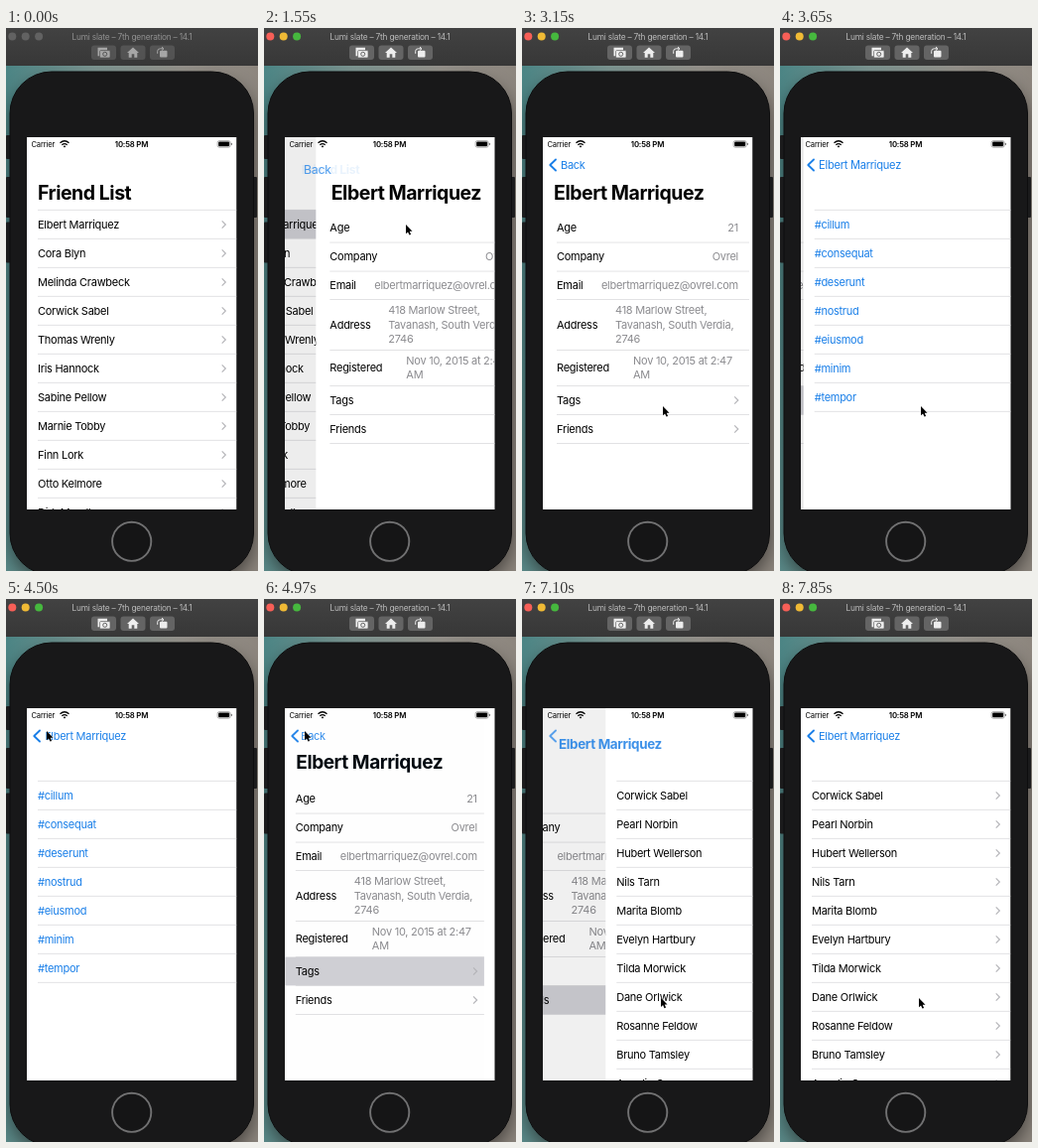
An HTML page for the animation above (8000 ms loop, 254x547 px).

```html
<!DOCTYPE html>
<html lang="en">
<head>
<meta charset="utf-8">
<title>List navigation</title>
<style>
  html, body { margin: 0; width: 100%; height: 100%; overflow: hidden; background: #222; }
  svg { display: block; width: 100vw; height: 100vh; }
  text { font-family: Inter, "Open Sans", sans-serif; letter-spacing: -.024em; white-space: pre; }
</style>
</head>
<body>
<svg id="stage" viewBox="0 0 254 547" preserveAspectRatio="none"></svg>
<script>
const LOOP = 8000, LEFT = 21, TOP = 110, WIDTH = 211.5, HEIGHT = 375;
const BLUE = '#1a7fe8', GREY = '#8b8b8f', LINE = '#d6d6d9', PRESSED = '#d0d0d5';
const PERSON = 'Elbert Marriquez';
const svg = document.getElementById('stage');

// ---- drawing helpers ----
const text = (x, y, str, { size = 11, fill = '#000', weight = 400, anchor = 'start', id = '' } = {}) =>
  `<text ${id && `id="${id}"`} x="${x}" y="${y + size * .36}" font-size="${size}" fill="${fill}" font-weight="${weight}" text-anchor="${anchor}">${str}</text>`;
const rect = (x, y, w, h, fill, extra = '') =>
  `<rect x="${x}" y="${y}" width="${w}" height="${h}" fill="${fill}" ${extra}/>`;
const rule = (x1, x2, y) => rect(x1, y - .3, x2 - x1, .7, LINE);
const chevron = (x, y) =>
  `<path d="M${x - 1.8} ${y - 3.6}l3.6 3.6l-3.6 3.6" fill="none" stroke="#b6b6ba" stroke-width="1.2"/>`;
const page = (id, body) =>
  `<g id="${id}">${rect(LEFT, TOP, WIDTH, HEIGHT, '#fff')}${body}</g>`;

function listPage(id, rows, { fill = '#000', arrows = true, pressed = '' } = {}) {
  const items = rows.map((name, i) => {
    const y = 198 + i * 29;
    return text(32, y, name, { fill }) + rule(32, 232.5, y + 14.2) + (arrows ? chevron(219.5, y) : '');
  });
  return page(id, pressed + rule(32, 232.5, 183.2) + items.join(''));
}

function detailPage() {
  const rows = [
    ['Age', 201, 216], ['Company', 230, 245], ['Email', 259, 273.6], ['Address', 299, 324.6],
    ['Registered', 342, 360.6], ['Tags', 375, 389.4], ['Friends', 404, 418.4]
  ];
  const value = (x, y, str, anchor) => text(x, y, str, { fill: GREY, anchor });
  return page('detail',
    rect(24.5, 360.6, 204.5, 28.8, PRESSED, 'id="tagsPressed"') +
    rect(24.5, 389.4, 204.5, 29, PRESSED, 'id="friendsPressed"') +
    rows.map(([label, y, bottom]) => text(35, y, label) + rule(35, 229, bottom)).join('') +
    value(218, 201, '21', 'end') + value(218, 230, 'Ovrel', 'end') +
    value(218, 259, 'elbertmarriquez@ovrel.com', 'end') +
    ['418 Marlow Street,', 'Tavanash, South Verdia,', '2746']
      .map((s, i) => value(94, 284.5 + i * 14.5, s)).join('') +
    value(112, 335, 'Nov 10, 2015 at 2:47') + value(112, 349.5, 'AM') +
    chevron(216, 375) + chevron(216, 404));
}

const people = [PERSON, 'Cora Blyn', 'Melinda Crawbeck', 'Corwick Sabel', 'Thomas Wrenly', 'Iris Hannock',
  'Sabine Pellow', 'Marnie Tobby', 'Finn Lork', 'Otto Kelmore', 'Dirk Mandle'];
const friends = ['Corwick Sabel', 'Pearl Norbin', 'Hubert Wellerson', 'Nils Tarn', 'Marita Blomb',
  'Evelyn Hartbury', 'Tilda Morwick', 'Dane Orlwick', 'Rosanne Feldow', 'Bruno Tamsley', 'Annelie Orsen'];
const tags = ['cillum', 'consequat', 'deserunt', 'nostrud', 'eiusmod', 'minim', 'tempor'].map(t => '#' + t);

const toolButton = (x, icon) =>
  rect(x, 17.5, 25, 14.5, '#646464', 'rx="3"') + `<g transform="translate(${x + 12.5} 24.8)">${icon}</g>`;

const windowBar = `
  <g id="bar">
    ${rect(0, 0, 254, 38, 'url(#barFill)')}
    ${['#f75f57', '#f0ba35', '#46b83e'].map((c, i) => `<circle class="light" data-on="${c}" cx="${6.3 + i * 13.4}" cy="8.6" r="4"/>`).join('')}
    ${text(127, 8.7, 'Lumi slate – 7th generation – 14.1', { size: 8.3, fill: '#bdbdbd', anchor: 'middle', id: 'caption' })}
    <g id="tools">
      ${toolButton(86, '<path d="M-6-5h9.500v3H-3V3.500H-6Z" fill="#eee"/><rect x="-4" y="-2.200" width="10.500" height="7.400" rx="1" fill="#eee" stroke="#646464" stroke-width=".7"/><circle cx="1.200" cy="1.500" r="2" fill="none" stroke="#646464"/>')}
      ${toolButton(115.5, '<path d="M-6 .3L0-5.200 6 .3H4.300V5H1.300V1.500H-1.300V5H-4.300V.3Z" fill="#eee"/>')}
      ${toolButton(145, '<rect x="-2.500" y="-2" width="7.500" height="6.800" rx="1" fill="#eee"/><path d="M-4.800 1V-1.500Q-4.800-4 -2-4H1M-.5-5.800L1.500-4-.5-2.200" fill="none" stroke="#eee"/>')}
    </g>
  </g>`;

const device = `
  ${rect(0, 37, 254, 510, 'url(#wall)')}
  ${rect(4, 52, 245.5, 507, '#000', 'rx="42" opacity=".5" filter="url(#soft)"')}
  ${[[0, 108, 24], [0, 150, 41], [0, 195.5, 41], [247, 150, 41]].map(([x, y, h]) => rect(x, y, 6, h, '#1b1b1c', 'rx="1"')).join('')}
  ${rect(4, 44, 245.5, 507, '#181819', 'rx="42" stroke="#0d0d0e"')}
  <circle cx="126.700" cy="517.300" r="19.600" fill="#151516" stroke="#717172" stroke-width="1.900"/>`;

const statusBar =
  text(25.5, 117, 'Carrier', { size: 7.6 }) +
  text(126.5, 117, '10:58 PM', { size: 7.8, weight: 600, anchor: 'middle' }) +
  `<g fill="none" stroke="#000" stroke-width="1.300">
    <path d="M54.500 115.800Q59 111.800 63.500 115.800M56.300 117.800Q59 115.500 61.700 117.800"/>
    <path d="M57.600 118.900L59 120.400L60.400 118.900Q59 117.900 57.600 118.900Z" fill="#000" stroke="none"/>
    <rect x="213.200" y="113.600" width="13" height="6.600" rx="1.900" stroke="#777" stroke-width=".6"/>
  </g>` + rect(214.2, 114.6, 11, 4.6, '#000', 'rx="1"') + rect(226.9, 115.8, 1, 2.2, '#777', 'rx=".5"');

const navigation = `
  <path id="backArrow" d="M34 132.500L28.300 138L34 143.500" fill="none" stroke="${BLUE}" stroke-width="1.900" stroke-linecap="round" stroke-linejoin="round"/>
  ${text(0, 0, '', { fill: BLUE, id: 'oldBack' })}
  ${text(0, 0, '', { fill: BLUE, id: 'newBack' })}
  ${text(0, 0, '', { size: 19.5, weight: 700, id: 'oldTitle' })}
  ${text(0, 0, '', { size: 19.5, weight: 700, id: 'newTitle' })}`;

svg.innerHTML = `
  <defs>
    <linearGradient id="wall" x2="1" y2=".1">
      <stop offset="0" stop-color="#4b8484"/><stop offset=".35" stop-color="#7f9894"/>
      <stop offset=".7" stop-color="#99958e"/><stop offset="1" stop-color="#8c857d"/>
    </linearGradient>
    <linearGradient id="barFill" x2="0" y2="1">
      <stop offset="0" stop-color="#424242"/><stop offset="1" stop-color="#373737"/>
    </linearGradient>
    <filter id="soft" x="-.2" y="-.2" width="1.4" height="1.4"><feGaussianBlur stdDeviation="9"/></filter>
    <clipPath id="screen">${rect(LEFT, TOP, WIDTH, HEIGHT, '#fff')}</clipPath>
  </defs>
  ${device}${windowBar}
  <g clip-path="url(#screen)">
    ${listPage('list', people, { pressed: rect(LEFT, 183, WIDTH, 29, PRESSED, 'id="personPressed"') })}
    ${detailPage()}
    <rect id="shade" x="${LEFT}" y="${TOP}" width="${WIDTH}" height="${HEIGHT}"/>
    ${listPage('tags', tags, { fill: BLUE, arrows: false })}
    ${listPage('friends', friends)}
    ${navigation}${statusBar}
  </g>
  <circle id="tap" r="14.200" fill="none" stroke="#111" stroke-width="1.300"/>
  <path id="cursor" d="M0 0V9.300L2.100 7.400L3.500 10.600L5.100 9.900L3.700 6.800H6.500Z" stroke="#fff" stroke-width=".8" paint-order="stroke"/>`;

const el = {};
svg.querySelectorAll('[id]').forEach(node => el[node.id] = node);
const lights = svg.querySelectorAll('.light');

// ---- motion ----
const screens = {
  list: { title: 'Friend List', back: '' },
  detail: { title: PERSON, back: 'Back' },
  tags: { title: '', back: PERSON },
  friends: { title: '', back: PERSON }
};
const moves = [
  { at: 1300, under: 'list', over: 'detail' },
  { at: 3180, under: 'detail', over: 'tags' },
  { at: 4620, under: 'detail', over: 'tags', pop: true },
  { at: 6920, under: 'detail', over: 'friends' }
];
const cursorPath = [[400, 235, 220], [1080, 143, 198], [2150, 143, 198], [2750, 142, 381], [3720, 142, 381],
  [4480, 41, 133], [5150, 41, 133], [5650, 140, 399], [5900, 140, 399], [6000, 140, 401], [7700, 140, 402]];
const taps = [1100, 2900, 4530, 5650];

const clamp = v => Math.max(0, Math.min(1, v));
const mix = (a, b, k) => a + (b - a) * k;
const smooth = k => k * k * (3 - 2 * k);
const settle = ms => { const x = Math.max(0, ms) * .0135; return 1 - (1 + x) * Math.exp(-x); };
const show = (node, on) => node.setAttribute('opacity', +on);
const shift = (node, x, y = 0, scale = 1) =>
  node.setAttribute('transform', `translate(${x} ${y}) scale(${scale})`);

function cursorAt(t) {
  const next = cursorPath.findIndex(p => p[0] > t);
  if (next < 0) return cursorPath[cursorPath.length - 1].slice(1);
  if (next === 0) return null;
  const a = cursorPath[next - 1], b = cursorPath[next];
  const k = smooth((t - a[0]) / (b[0] - a[0]));
  return [mix(a[1], b[1], k), mix(a[2], b[2], k)];
}

function label(node, str, x, y, scale, opacity) {
  if (node.textContent !== str) node.textContent = str;
  shift(node, x, y, scale);
  show(node, clamp(opacity));
}

// The large title shrinks and turns blue, then hands over to the back label.
function drawNavigation(under, over, p) {
  const from = screens[under], to = screens[over], r = 1 - p;
  const y = mix(166, 138, p), grow = mix(1.8, 1, p), tint = clamp(p * 1.4);
  label(el.oldTitle, from.title, mix(32, 39, p), y, grow / 1.8, (r - .13) / .2);
  el.oldTitle.setAttribute('fill', `rgb(${26 * tint},${127 * tint},${232 * tint})`);
  label(el.newBack, to.back, mix(46, 39, p), y, grow, (p - .7) / .2);
  label(el.oldBack, from.back, 39 - p * 35, 138, 1, 1 - 2 * p);
  label(el.newTitle, to.title, 32 + r * WIDTH * 1.14, 166, 1, p * 1.2);
  show(el.backArrow, from.back ? 1 - 1.4 * p * r : clamp((p - .86) / .14));
}

function draw(t) {
  const move = moves.filter(m => t >= m.at).pop() || moves[0];
  const k = settle(t - move.at), p = move.pop ? 1 - k : k;
  for (const id in screens) {
    const visible = id === move.under || id === move.over;
    el[id].setAttribute('display', visible ? 'inline' : 'none');
  }
  shift(el[move.under], -.3 * WIDTH * p);
  shift(el[move.over], WIDTH * (1 - p));
  el[move.under].after(el.shade);
  show(el.shade, .085 * p);
  drawNavigation(move.under, move.over, p);

  show(el.personPressed, t >= 1250);
  show(el.tagsPressed, t < 3180 ? 0 : 1 - clamp((t - 6550) / 150));
  show(el.friendsPressed, t >= 5750);

  const active = t >= 1250;
  lights.forEach(l => l.setAttribute('fill', active ? l.dataset.on : '#626262'));
  show(el.caption, active ? 1 : .65);
  show(el.tools, active ? 1 : .6);

  const pos = cursorAt(t);
  show(el.cursor, !!pos);
  if (pos) { shift(el.cursor, ...pos); shift(el.tap, ...pos); }
  show(el.tap, taps.some(at => t >= at && t < at + 180));
}

['oldTitle', 'newTitle', 'oldBack', 'newBack'].forEach(id =>
  el[id].setAttribute('y', el[id].getAttribute('font-size') * .36));

function frame() {
  draw(performance.now() % LOOP);
  requestAnimationFrame(frame);
}
frame();
</script>
</body>
</html>
```
